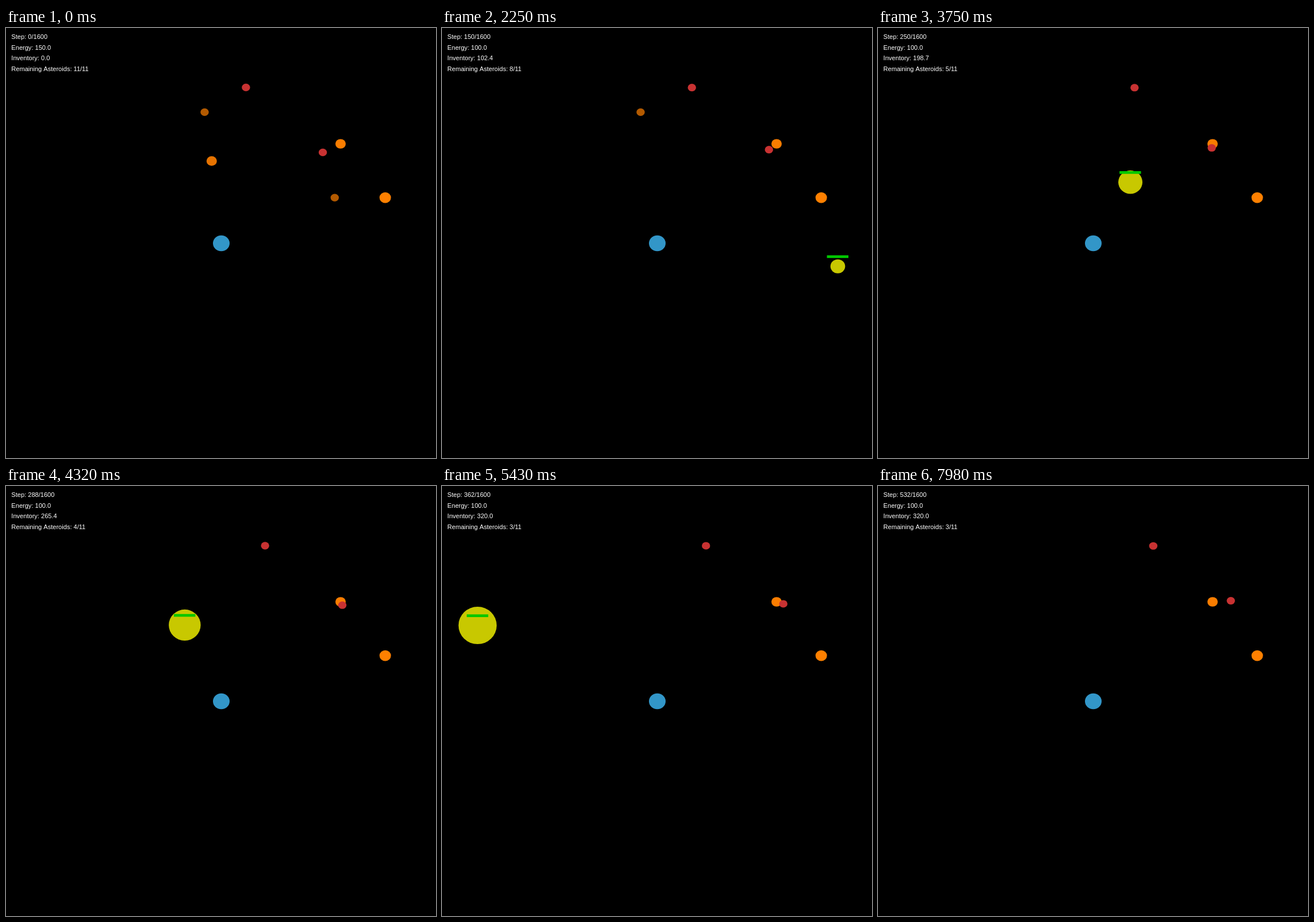
These frames come from a looping animation (748 px wide and 748 px high, 8000 ms). An HTML page with a canvas:

```html
<!DOCTYPE html>
<html lang="en">
<head>
<meta charset="utf-8">
<title>Asteroid mining</title>
<style>
  html, body { margin: 0; width: 100%; height: 100%; overflow: hidden; background: #000; }
  canvas { display: block; }
</style>
</head>
<body>
<canvas id="stage" width="748" height="748"></canvas>
<script>
const ctx = document.getElementById("stage").getContext("2d");
const LOOP = 8000, TICK = 30, STEPS_PER_TICK = 2;
const TOTAL = 11, MAX_LOAD = 320, LOAD_PER_ASTEROID = 36;

// richness sets the brightness; an asteroid is gone from step "end" on
const asteroids = [
  { x: 345.5, y: 146.4, r: 7.2, richness: 0.7, end: 200 },
  { x: 357.8, y: 231.4, r: 9, richness: 0.9, end: 140 },
  { x: 571.8, y: 295.1, r: 7.2, richness: 0.7, end: 122 },
  { x: 582, y: 201.5, r: 9, richness: 0.98, end: Infinity },
  { x: 659.7, y: 295.1, r: 10, richness: 1, end: Infinity }
];

// Velocities are per step
const obstacles = [
  { x: 417.4, y: 103.4, vx: 0.1155, vy: 0.0016 },
  { x: 551.1, y: 216.4, vx: 0.1178, vy: -0.0316 }
];

// The ship's course: it comes in from the right and leaves on the left
const course = [
  { step: 0, x: 1100, y: 650, load: 0 },
  { step: 70, x: 910, y: 550, load: 31.9 },
  { step: 150, x: 688.5, y: 414.6, load: 102.4 },
  { step: 250, x: 439, y: 268.2, load: 198.7 },
  { step: 324, x: 182.8, y: 234.3, load: MAX_LOAD },
  { step: 400, x: -56, y: 258, load: MAX_LOAD }
];

// Cubic Hermite curve through one property of the course
function along(prop, s) {
  const last = course.length - 1;
  let i = 0;
  while (i < last - 1 && s >= course[i + 1].step) i++;
  const slope = k => {
    const a = course[Math.max(0, k - 1)], b = course[Math.min(last, k + 1)];
    return (b[prop] - a[prop]) / (b.step - a.step);
  };
  const from = course[i], to = course[i + 1], span = to.step - from.step;
  const u = Math.min(1, (s - from.step) / span), v = 1 - u;
  return v * v * (1 + 2 * u) * from[prop] + u * u * (3 - 2 * u) * to[prop]
    + span * u * v * (v * slope(i) - u * slope(i + 1));
}

function disc(x, y, r, color) {
  ctx.fillStyle = color;
  ctx.beginPath();
  ctx.ellipse(x, y, r, r - 0.65, 0, 0, Math.PI * 2);
  ctx.fill();
}

function drawAsteroid({ x, y, r, richness }) {
  disc(x, y, r, `rgb(${Math.round(255 * richness)}, ${Math.round(128 * richness)}, 0)`);
}

function drawShip(s, load) {
  const x = along("x", s), y = along("y", s);
  disc(x, y, Math.max(12.8, 1 + load * 0.1007), "#c8c800");
  ctx.fillStyle = "#00c800";
  ctx.fillRect(x - 18.9, y - 19.2, 37.4, 4.7);
}

function drawStatus(s, load) {
  const mined = Math.min(8, Math.round(load / LOAD_PER_ASTEROID));
  const lines = [
    `Step: ${s}/1600`,
    `Energy: ${s ? "100.0" : "150.0"}`,
    `Inventory: ${load.toFixed(1)}`,
    `Remaining Asteroids: ${TOTAL - mined}/${TOTAL}`
  ];
  ctx.font = '11.07px "Liberation Sans", Arial, sans-serif';
  ctx.fillStyle = "#fff";
  lines.forEach((line, i) => ctx.fillText(line, 9.35, 19 + i * 18.7));
}

function draw(now) {
  const s = Math.floor((now % LOOP) / TICK) * STEPS_PER_TICK;
  const load = Math.min(MAX_LOAD, along("load", s));
  ctx.fillStyle = "#000";
  ctx.fillRect(0, 0, 748, 748);
  disc(374.5, 374.5, 14.5, "#3296c8");
  asteroids.filter(a => s < a.end).forEach(drawAsteroid);
  for (const { x, y, vx, vy } of obstacles) disc(x + vx * s, y + vy * s, 7.2, "#c83232");
  drawShip(s, load);
  drawStatus(s, load);
}

const start = performance.now();
function frame() {
  draw(performance.now() - start);
  requestAnimationFrame(frame);
}
frame();
</script>
</body>
</html>
```
